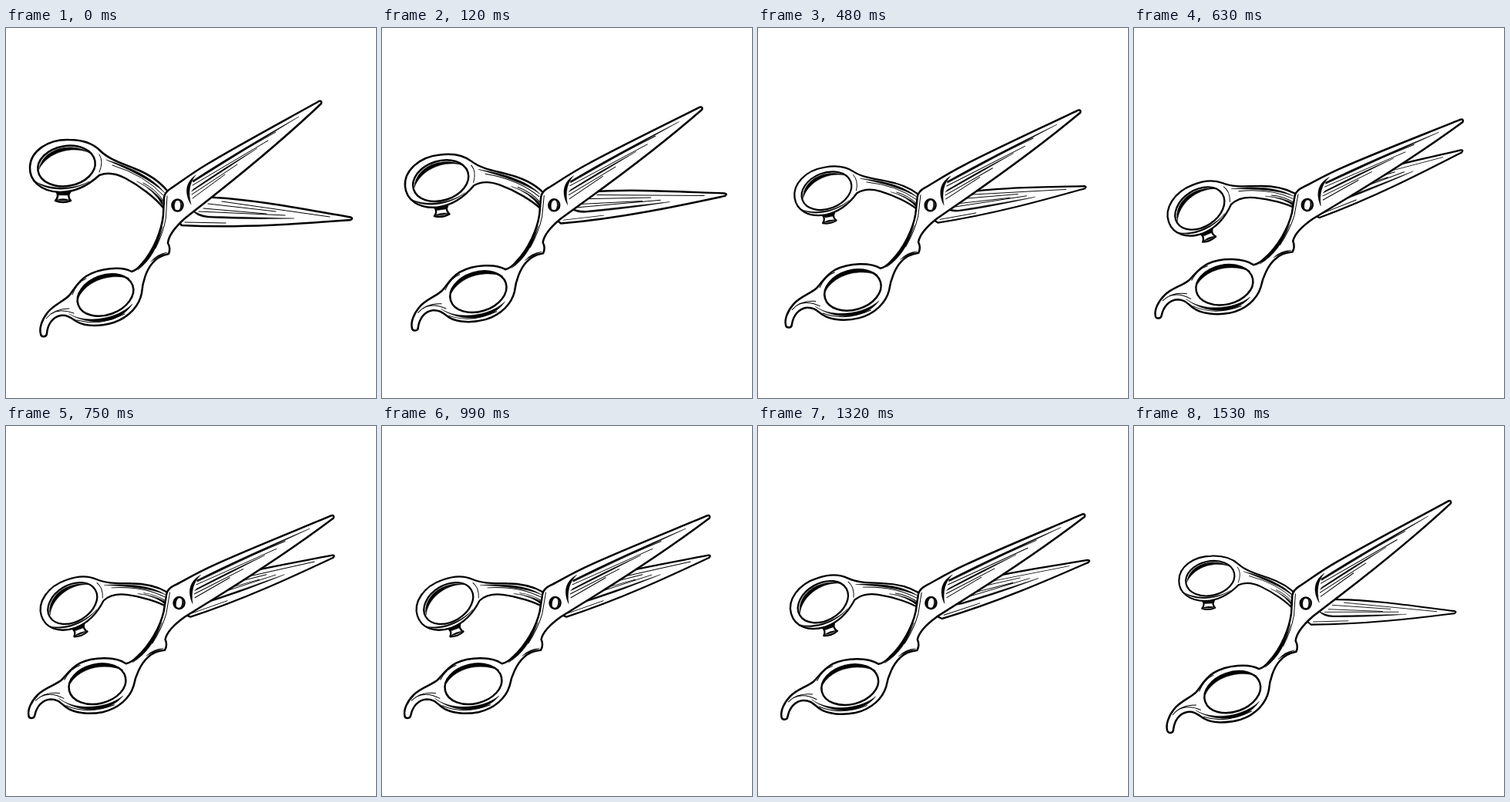
Animation, 480 px wide and 480 px high, one loop 1560 ms. Source, as an HTML page:

```html
<!DOCTYPE html>
<html lang="en">
<head>
<meta charset="utf-8">
<title>Scissors</title>
<style>
  html, body { margin: 0; width: 100%; height: 100%; overflow: hidden; background: #fff; }
  svg { display: block; width: 100vw; height: 100vh; }
  .body { fill: #fff; stroke: #000; stroke-width: 2.5; }
  .line { fill: none; stroke: #000; stroke-width: 1; }
  .ink { fill: #000; stroke: #000; stroke-width: .4; }
</style>
</head>
<body>
<svg viewBox="0 0 480 480" stroke-linecap="round" stroke-linejoin="round">
  <g id="back">
    <path class="body" d="M66 213 L83 213 Q79 218 84 224 Q74 228 64 224 Q69 219 66 213Z"/>
    <path class="ink" d="M66 214 L83 214 L80 217 L69 217Z M65 223 Q74 220 83 223 Q75 225 65 223Z"/>
    <path class="body" d="M82 145 C100 145 114 151 122 159 C134 171 152 176 166 182 C184 189 200 200 209 211
      L235 217 L272 220 C325 223 385 235 447 245.500 Q451 247 447 249 C395 253 310 260 228 256 L203 232
      C193 220 174 205 155 195 C142 188 131 187 121 191 C108 203 92 213 70 213
      C45 212 30 198 31 180 C32 160 54 144 82 145Z"/>
    <ellipse class="body" cx="78.500" cy="179" rx="37.500" ry="26" transform="rotate(-10 78.500 179)"/>
    <path class="ink" d="M43 183 C47 158 82 146 109 162 C84 152 54 162 43 183Z
      M38 199 C52 212 86 213 108 199 C88 210 57 210 38 199Z
      M130 171 C160 180 190 193 206 214 C188 197 160 184 130 171Z
      M170 199 Q192 210 203 230 L203 224 Q191 209 170 199Z"/>
    <path class="line" d="M121 164 Q127 173 121 187 M138 178 Q180 191 204 217 M178 201 Q194 209 205 225"/>
    <path class="ink" d="M240 235 Q247 245 262 246 C300 248 340 248 374 247 C335 246 290 245 262 244 Q249 242 240 235Z"/>
    <path class="line" d="M256 234 L338 241 M250 238 L362 243 M262 228 L350 238 M280 225 L420 245 M232 252 L285 253"/>
  </g>
  <g id="front">
    <path class="body" d="M406 95 C365 118 300 153 262 176 C240 189 222 203 214 208 Q206 213 205 220 L204 243
      C202 262 192 288 176 306 Q170 314 163 316 C150 309 122 311 104 322 C92 330 88 340 82 347
      C74 355 62 359 54 369 C46 379 43 390 45 397 C46 402 53 401 53 396 C54 385 60 375 71 373
      C80 372 84 376 92 381 C104 388 124 387 140 382 C160 375 173 360 176 344
      C177 330 182 314 190 305 Q197 296 211 293 Q214 286 210 279 C211 268 222 256 232 247
      L270 217 C318 179 370 135 409 98 Q410 94 406 95Z"/>
    <ellipse class="body" cx="129" cy="346.500" rx="37.500" ry="25.500" transform="rotate(-20 129 346.500)"/>
    <path class="ink" d="M94 350 C98 325 136 311 160 325 C136 318 105 327 94 350Z
      M82 371 C104 384 144 378 164 358 C148 384 108 387 82 371Z
      M203 258 C198 282 188 301 171 314 C185 297 196 279 203 258Z
      M188 303 Q196 293 209 291 Q196 297 188 303Z"/>
    <path class="line" d="M92 379 Q122 388 154 371 M86 346 Q92 330 104 325 M52 377 Q62 364 82 364
      M58 371 Q70 363 88 370 M209 218 L207.500 246 Q204 266 194 286"/>
    <path class="ink" d="M246 191 C233 200 231 214 240 229 C236 213 238 201 246 191Z
      M242 198 Q300 160 380 115 Q307 160 243 200Z
      M243 209 Q282 182 326 156 Q284 184 241 212Z"/>
    <path class="line" d="M242 204 L340 146 M241 216 L300 177 M242 221 L284 190 M290 169 L350 135"/>
    <ellipse class="body" cx="222.500" cy="230" rx="7" ry="7.500"/>
    <path class="ink" d="M221 224 C215 226 215 234 220 237 C218 232 218 227 221 224Z M225 224 C229 227 229 234 225 236 C227 232 227 228 225 224Z"/>
  </g>
</svg>
<script>
const LOOP = 1560, STEP = 30;
const back = document.getElementById("back"), front = document.getElementById("front");

// pose: front angle, back angle, back scale, back centre x, y
const start = [0, 0, 1, 262.5, 213];
const open = [0.1, -0.6, 0.845, 257.2, 221.7];
const shut = [9, -28.5, 0.943, 254, 191];
const half = [2.55, -7.74, 0.883, 256.5, 212.5];
const wide = [8.9, -28.4, 0.969, 255.4, 191.9];
const keys = [
  [0, start], [345, shut], [530, half], [684, shut], [870, open],
  [1056, shut], [1215, open], [1387, wide], [LOOP, open]
];

const ease = u => (1 - Math.cos(Math.PI * u)) / 2;

function poseAt(t) {
  const i = keys.findIndex(k => k[0] > t);
  const [t0, a] = keys[i - 1], [t1, b] = keys[i];
  const e = ease((t - t0) / (t1 - t0));
  return a.map((v, n) => v + (b[n] - v) * e);
}

function draw(now) {
  const t = Math.floor((now % LOOP) / STEP) * STEP;
  const [fa, ba, s, x, y] = poseAt(t);
  front.setAttribute("transform", `rotate(${fa} 228 248)`);
  back.setAttribute("transform", `translate(${x} ${y}) rotate(${ba}) scale(${s}) translate(-262.5 -213)`);
}

let begin;
function tick(now) {
  begin ??= now;
  draw(now - begin);
  requestAnimationFrame(tick);
}
draw(0);
requestAnimationFrame(tick);
</script>
</body>
</html>
```
